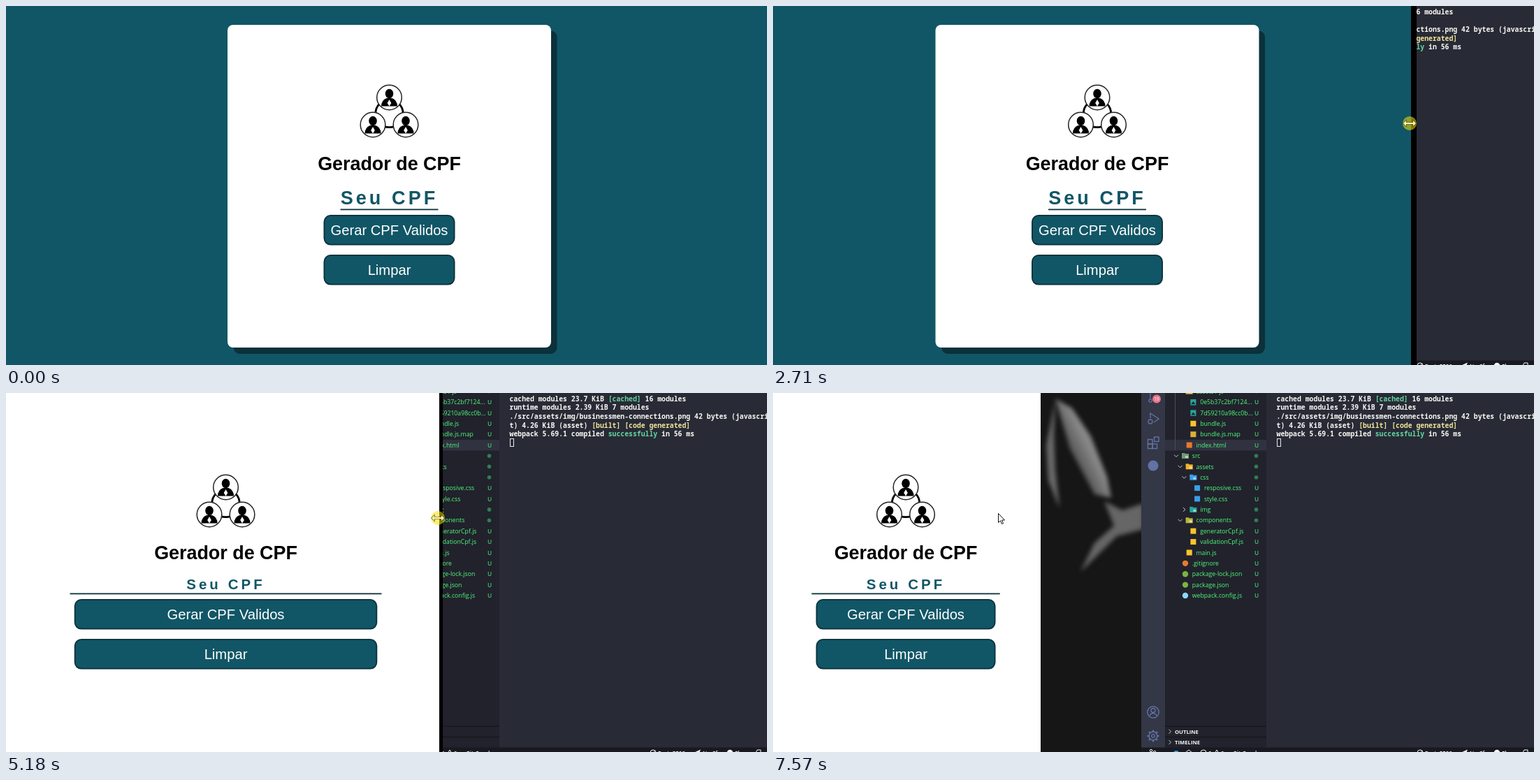
Animation of 1089 by 514 pixels, one loop 8.1 s. Source, as an HTML page with a canvas:

```html
<!DOCTYPE html>
<html lang="pt-BR">
<head>
<meta charset="utf-8">
<title>Gerador de CPF</title>
<style>
html, body { margin: 0; width: 100%; height: 100%; overflow: hidden; background: #115666; }
canvas { display: block; width: 100vw; height: 100vh; }
</style>
</head>
<body>
<canvas id="stage" width="1089" height="514"></canvas>
<script>
const ctx = document.getElementById('stage').getContext('2d');
const LOOP = 8100, STAGE_W = 1089, STAGE_H = 514, EDITOR_X = 527;
const TEAL = '#115666', DARK = '#0b313b';
const SANS = '"Liberation Sans", Arial, sans-serif';
const UI = '"Open Sans", "Noto Sans", sans-serif';
const MONO = '"Noto Sans Mono", "DejaVu Sans Mono", monospace';

// ---- motion ----

// Turning points of the drag: step, right edge of the page.
const DRAG = [[0, 1100], [7, 1043], [20, 913], [32, 765], [34, 757],
  [44, 687], [46, 682], [58, 599], [63, 535], [80, 383]];
const DROP = 80, REST = 87;

// The screen refreshes about every 70 ms, and not during the last pause.
function stepAt(t) {
  if (t < 1340) return -1;
  if (t < 7500) return Math.min(85, Math.floor((t - 1320) / 69.4));
  return Math.min(REST, 86 + Math.floor((t - 7500) / 70));
}

function edgeAt(step) {
  const s = Math.max(0, Math.min(DROP, step));
  const i = Math.max(1, DRAG.findIndex(p => p[0] >= s));
  const [s0, x0] = DRAG[i - 1], [s1, x1] = DRAG[i];
  return x0 + (x1 - x0) * (s - s0) / (s1 - s0);
}

// Layout and the uncovered window lag behind the dragged edge.
function poseAt(step) {
  const edge = Math.round(edgeAt(step));
  return {
    edge,
    bare: Math.round(edgeAt(step - 0.8)),
    width: Math.round(edgeAt(step - 1.8) - 3)
  };
}

// ---- drawing helpers ----

function rect(x, y, w, h, color) {
  ctx.fillStyle = color;
  ctx.fillRect(x, y, w, h);
}

function round(x, y, w, h, r, color) {
  ctx.fillStyle = color;
  ctx.beginPath();
  ctx.roundRect(x, y, w, h, r);
  ctx.fill();
}

function disc(x, y, r, color) {
  ctx.fillStyle = color;
  ctx.beginPath();
  ctx.arc(x, y, r, 0, Math.PI * 2);
  ctx.fill();
}

function ring(x, y, r, color, width) {
  ctx.strokeStyle = color;
  ctx.lineWidth = width;
  ctx.beginPath();
  ctx.arc(x, y, r, 0, Math.PI * 2);
  ctx.stroke();
}

function box(x, y, w, h, color, width = 1) {
  ctx.strokeStyle = color;
  ctx.lineWidth = width;
  ctx.strokeRect(x, y, w, h);
}

function trace(points, close) {
  ctx.beginPath();
  for (let i = 0; i < points.length; i += 2) ctx.lineTo(points[i], points[i + 1]);
  if (close) ctx.closePath();
}

function line(points, color, width = 1) {
  trace(points);
  ctx.strokeStyle = color;
  ctx.lineWidth = width;
  ctx.stroke();
}

function poly(points, color) {
  trace(points, true);
  ctx.fillStyle = color;
  ctx.fill();
}

function text(str, x, y, font, color, align = 'left', spacing = 0) {
  ctx.font = font;
  ctx.fillStyle = color;
  ctx.textAlign = align;
  ctx.letterSpacing = spacing + 'px';
  ctx.fillText(str, x, y);
}

function clipTo(x, w, draw) {
  if (w <= 0) return;
  ctx.save();
  ctx.beginPath();
  ctx.rect(x, 0, w, STAGE_H);
  ctx.clip();
  draw();
  ctx.restore();
}

// ---- web page ----

function person(x, y) {
  ctx.save();
  ctx.translate(x, y);
  disc(0, 0, 18, '#fff');
  ring(0, 0, 17.8, '#222', 1.5);
  ctx.fillStyle = '#000';
  ctx.beginPath();
  ctx.ellipse(0, -5.5, 5.8, 6.7, 0, 0, Math.PI * 2);
  ctx.fill();
  ctx.beginPath();
  ctx.moveTo(-11.5, 12.5);
  ctx.quadraticCurveTo(-11.5, 4, -4, 1);
  ctx.lineTo(4, 1);
  ctx.quadraticCurveTo(11.5, 4, 11.5, 12.5);
  ctx.fill();
  poly([0, 3, 2.8, 8, 0, 12.5, -2.8, 8], '#fff');
  ctx.restore();
}

function teamIcon(x, y) {
  ring(x, y + 23, 19.7, '#000', 2.8);
  person(x, y);
  person(x - 23.5, y + 39);
  person(x + 23.5, y + 39);
}

function button(label, mid, y, w) {
  const x = mid - w / 2;
  round(x, y, w, 43.6, 10, DARK);
  round(x + 1.8, y + 1.8, w - 3.6, 40, 8.5, TEAL);
  text(label, mid, y + 29, '20.2px ' + SANS, '#fff', 'center');
}

function page(width) {
  const mid = width / 2, wide = width >= 750;
  const lineW = wide ? 140 : width * 0.709;
  const btnW = wide ? 188 : lineW - 12.4;
  const dy = wide ? 0 : 4;
  rect(0, 0, STAGE_W, STAGE_H, wide ? TEAL : '#fff');
  if (wide) {
    round(mid - 223, 35.5, 463, 462.5, 9, DARK);
    round(mid - 231.5, 27, 463, 462, 8, '#fff');
  }
  teamIcon(mid, 131 + dy);
  text('Gerador de CPF', mid, 235 + dy * 0.8, 'bold 26.9px ' + SANS, '#000', 'center');
  text('Seu CPF', mid, wide ? 284 : 281, `bold ${wide ? 27 : 20.4}px ${SANS}`, TEAL, 'center', 4.1);
  rect(mid - lineW / 2, 290.5 - dy, lineW, 1.8, DARK);
  button('Gerar CPF Validos', mid, 299 - dy, btnW);
  button('Limpar', mid, 356 - dy, btnW);
}

// ---- editor ----

// Two spaces per level; "/" marks an open folder, "+" a closed one.
const TREE = `  assets / js/
    0e5b37c2bf7124...
    7d59210a98cc0b...
    bundle.js
    bundle.js.map
  index.html
src/
  assets/
    css/
      resposive.css
      style.css
    img+
  components/
    generatorCpf.js
    validationCpf.js
  main.js
.gitignore
package-lock.json
package.json
webpack.config.js`.split('\n');

const FOLDER_COLORS = { src: '#6f9a72', css: '#3aa0e8', img: '#26a69a', components: '#b9b73c' };
const FILE_COLORS = { js: '#f7c52b', map: '#d9b23a', html: '#e8792f', css: '#3aa0e8',
  gitignore: '#e8792f', json: '#7cb342' };

function chevron(x, y, open) {
  line(open ? [x - 3, y - 1.5, x, y + 1.5, x + 3, y - 1.5]
            : [x - 1.5, y - 3, x + 1.5, y, x - 1.5, y + 3], '#c8c8c8');
}

function folderIcon(name, x, y) {
  const color = FOLDER_COLORS[name] || '#f0b429';
  rect(x - 5, y - 4, 4.5, 3, color);
  rect(x - 5, y - 3, 10, 7, color);
  rect(x, y, 4, 3, 'rgba(255,255,255,.55)');
}

function fileIcon(name, level, x, y) {
  const color = FILE_COLORS[name.split('.').pop()];
  if (name.startsWith('webpack')) disc(x, y, 4.2, '#8dd6f9');
  else if (!color) {
    rect(x - 4, y - 4, 8, 8.5, '#26a69a');
    poly([x - 3, y + 3, x, y - 1, x + 3, y + 3], '#21222c');
  } else if (level) rect(x - 4, y - 4, 8, 8, color);
  else disc(x, y, 4.2, color);
}

function explorer() {
  rect(561, 0, 145, STAGE_H, '#21222c');
  rect(561, 67, 145, 15.4, '#303240');
  line([575.5, 0, 575.5, 82], '#4b4d5c');
  TREE.forEach((entry, i) => {
    const level = entry.search(/\S/) / 2, folder = /[/+]$/.test(entry);
    const name = entry.trim().replace(/[/+]$/, '');
    const x = 590 + level * 5.7, y = -2.4 + i * 15.39;
    text(name, x + 9.8, y + 3.2, '500 8.7px ' + UI, '#50fa7b');
    if (folder) {
      chevron(x - 13, y, entry.endsWith('/'));
      folderIcon(name, x, y);
      disc(691.5, y, 2.8, '#2f7d55');
    } else {
      fileIcon(name, level, x, y);
      text('U', 692, y + 3.2, '600 8.4px ' + UI, '#45c873', 'center');
    }
  });
  ['OUTLINE', 'TIMELINE'].forEach((label, i) => {
    const y = 484.7 + i * 15.4;
    rect(561, y - 8, 145, 1, '#111219');
    chevron(568, y, false);
    text(label, 575, y + 2.9, 'bold 7.7px ' + UI, '#f8f8f2');
  });
}

function activityBar() {
  const c = '#6272a4';
  rect(EDITOR_X, 0, 34, STAGE_H, '#343746');
  line([540, 0, 540, 9], c, 1.3);
  ring(540, 11, 2.2, c, 1.2);
  disc(549, 8.5, 6, '#e8758c');
  text('19', 549, 11, '6.5px ' + UI, '#fff', 'center');
  line([540, 36, 540, 29, 552, 37, 545, 42], c, 1.4);
  ring(540, 41, 3, c, 1.3);
  box(536.5, 66.5, 6.5, 6.5, c, 1.4);
  box(536.5, 73, 6.5, 6.5, c, 1.4);
  box(543, 73, 6.5, 6.5, c, 1.4);
  box(545.5, 63, 6.5, 6.5, c, 1.4);
  disc(544, 104, 7.5, c);
  ring(544, 457, 8.2, c, 1.4);
  ring(544, 454.5, 3, c, 1.3);
  ctx.beginPath();
  ctx.arc(544, 464, 5.5, Math.PI * 1.1, Math.PI * 1.9);
  ctx.stroke();
  ring(544, 491, 6, c, 1.5);
  ring(544, 491, 2.3, c, 1.3);
  for (let a = 0; a < Math.PI * 2; a += Math.PI / 4) {
    const dx = Math.cos(a), dy = Math.sin(a);
    line([544 + dx * 6, 491 + dy * 6, 544 + dx * 8.5, 491 + dy * 8.5], c, 2);
  }
}

const OUTPUT = `cached modules 23.7 KiB [cached] 16 modules
runtime modules 2.39 KiB 7 modules
./src/assets/img/businessmen-connections.png 42 bytes (javascript)
t) 4.26 KiB (asset) [built] [code generated]
webpack 5.69.1 compiled successfully in 56 ms`.split('\n');

function outputColor(part) {
  if (/^(\[cached\]|successfully)$/.test(part)) return '#62d6a0';
  return part.startsWith('[') ? '#f0e59a' : '#f8f8f2';
}

function terminal() {
  OUTPUT.forEach((row, i) => {
    let x = 720.6;
    for (const part of row.split(/(\[.*\]|successfully)/)) {
      text(part, x, 11.7 + i * 12.6, 'bold 9.8px ' + MONO, outputColor(part));
      x += ctx.measureText(part).width;
    }
  });
  box(721.5, 65.5, 5, 11, '#e8e8e8');
}

function statusBar() {
  const c = '#f8f8f2', label = (str, x) => text(str, x, 518.5, '600 8px ' + UI, c);
  rect(EDITOR_X, 507.5, STAGE_W - EDITOR_X, 7, '#191a21');
  ring(541, 512, 1.7, c, 1);
  ring(546, 514, 1.7, c, 1);
  disc(577, 516, 4, '#3aa0e8');
  line([590, 515, 595, 511, 600, 515], c);
  ring(616, 515, 4, c, 1);
  label('0', 623);
  line([631, 518, 635, 511, 639, 518], c);
  label('0', 641);
  label('Git Graph', 658);
  ring(926, 515, 4, c, 1);
  line([923, 518, 929, 512], c);
  label('Port: 5500', 933);
  poly([984, 515, 994, 510.5, 991, 518], c);
  label('No Cfg', 997);
  disc(1036, 515, 4.3, c);
  label('Flow', 1043);
  line([1073, 515, 1075, 511, 1080, 511, 1080, 515], c);
}

function editor() {
  rect(EDITOR_X, 0, STAGE_W - EDITOR_X, STAGE_H, '#282a36');
  activityBar();
  explorer();
  terminal();
  statusBar();
}

// ---- desktop ----

function wallpaper() {
  rect(0, 0, EDITOR_X, STAGE_H, '#161616');
  ctx.save();
  ctx.filter = 'blur(3px)';
  poly([404, 10, 391, 75, 394, 125, 410, 165, 404, 110, 402, 60], '#6a6a6a');
  const fur = ctx.createLinearGradient(410, 80, 470, 50);
  fur.addColorStop(0, '#3a3a3a');
  fur.addColorStop(0.6, '#8a8a8a');
  fur.addColorStop(1, '#6a6a6a');
  poly([404, 8, 428, 22, 455, 62, 478, 120, 484, 150, 460, 145, 425, 80], fur);
  poly([474, 155, 500, 168, 530, 158, 530, 195, 492, 205, 440, 256, 460, 215, 488, 190], '#666');
  ctx.restore();
}

// ---- pointer ----

function resizePointer(x, y) {
  disc(x, y, 10, 'rgba(250,225,10,.55)');
  const shaft = [-9, 0, -5, -4, -5, -1, 5, -1, 5, -4, 9, 0, 5, 4, 5, 1, -5, 1, -5, 4];
  trace(shaft.map((v, i) => v + (i % 2 ? y : x)), true);
  ctx.strokeStyle = '#4a4310';
  ctx.lineWidth = 1.2;
  ctx.stroke();
  ctx.fillStyle = '#fff6b0';
  ctx.fill();
}

function arrowPointer(x, y) {
  const shape = [0, 0, 0, 13, 3, 10.3, 5, 15, 7, 14, 5, 9.5, 9, 9.5];
  trace(shape.map((v, i) => v + 0.5 + (i % 2 ? y : x)), true);
  ctx.fillStyle = '#fff';
  ctx.fill();
  ctx.strokeStyle = '#111';
  ctx.lineWidth = 1;
  ctx.stroke();
}

function pointer(step, edge) {
  if (step < 0) return;
  if (step <= DROP) {
    resizePointer(edge - 2, Math.round(164 + (1023 - edge) * 0.036));
    return;
  }
  // After the drop the pointer swings back over the page and settles.
  const left = (REST - step) / (REST - DROP);
  arrowPointer(Math.round(322 + 60 * left ** 2), Math.round(172 - 11 * Math.sin(Math.PI * left)));
}

function draw(t) {
  const step = stepAt(t), { edge, bare, width } = poseAt(step);
  const codeX = Math.max(bare, EDITOR_X);
  rect(0, 0, STAGE_W, STAGE_H, '#000');
  clipTo(codeX, STAGE_W - codeX, editor);
  clipTo(bare, EDITOR_X - bare, wallpaper);
  clipTo(0, edge, () => page(width));
  pointer(step, edge);
}

const start = performance.now();
function tick() {
  draw((performance.now() - start) % LOOP);
  requestAnimationFrame(tick);
}
tick();
</script>
</body>
</html>
```
